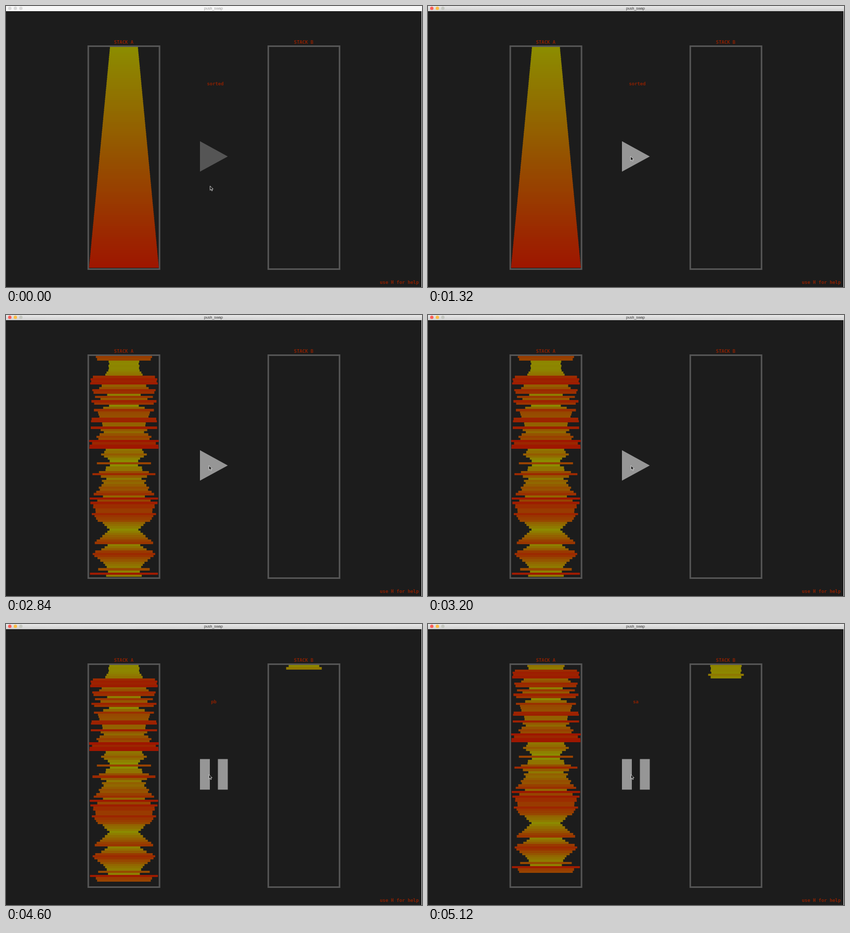
Write an HTML page that moves like this. It is 800 px wide and 542 px high and loops after 5160 ms.

```html
<!DOCTYPE html>
<html lang="en">
<head>
<meta charset="utf-8">
<title>push_swap</title>
<style>
  html, body { margin: 0; width: 100%; height: 100%; overflow: hidden; background: #1c1c1c; }
  svg { display: block; width: 800px; height: 542px; }
  .label { font: bold 8.9px "DejaVu Sans Mono", "Liberation Mono", monospace; fill: #8c2000; }
  #title { font: 7.1px "Liberation Sans", Arial, sans-serif; text-anchor: middle; }
  .frame { fill: none; stroke: #555; stroke-width: 3; }
</style>
</head>
<body>
<svg viewBox="0 0 800 542" xmlns="http://www.w3.org/2000/svg">
  <linearGradient id="active" x2="0" y2="1">
    <stop stop-color="#e8e8e8"/>
    <stop offset="1" stop-color="#d0d0d0"/>
  </linearGradient>
  <rect width="800" height="542" fill="#1c1c1c"/>
  <rect x="799" width="1" height="542" fill="#e0e0e0"/>
  <rect id="bar" width="800" height="10"/>
  <circle class="light" cx="7.3" cy="4.4" r="3.2"/>
  <circle class="light" cx="18" cy="4.4" r="3.2"/>
  <circle class="light" cx="28.6" cy="4.4" r="3.2"/>
  <text id="title" x="399" y="7">push_swap</text>

  <rect class="frame" x="158.2" y="77.5" width="137" height="430"/>
  <rect class="frame" x="504.4" y="77.5" width="137" height="430"/>
  <g id="stacks"></g>

  <text class="label" x="207.7" y="72.7">STACK A</text>
  <text class="label" x="553.8" y="72.7">STACK B</text>
  <text class="label" x="719" y="536">use H for help</text>
  <text class="label" id="op" y="152.5"></text>

  <path id="button"/>
  <path id="cursor" d="M0 0V8.4L2 6.6L3.3 9.6L4.7 9L3.4 6.1H6Z" fill="#111" stroke="#eee" stroke-width=".8"/>
</svg>
<script>
const LOOP = 5160, COUNT = 100, TOP = 79, PITCH = 4.265;
const FOCUS = 960, SHUFFLE = 2640, PRESS = 4200, PLAY = 4280, RELEASE = 4440, STEP = 80;
const CENTER = { a: 226.8, b: 573 };
const OPS = ['rra', 'pb', 'ra', 'ra', 'pb', 'sb', 'pb', 'pb', 'pb', 'pb', 'sa'];
const PLAY_ICON = 'M373 260.7L426.5 290.2L373 319.5Z';
const PAUSE_ICON = 'M373 260.5h19v59h-19zM407.5 260.5h19v59h-19z';

// Outline of the shuffled stack: row, width
const OUTLINE = [[0, 109], [1, 101], [2, 62], [5, 60], [8, 70], [9, 116], [24, 82], [40, 118],
  [46, 70], [60, 104], [73, 107], [78, 58], [84, 111], [85, 66], [89, 118], [95, 65],
  [96, 95], [97, 62], [98, 131], [99, 68]];
// Cursor keys: time, x, y
const PATH = [[120, 392.4, 347], [640, 388.7, 286.2], [1000, 388.7, 286.2],
  [1600, 390.4, 293], [2300, 390.4, 293], [2900, 390.3, 290.5]];

const $ = id => document.getElementById(id);
const lights = document.querySelectorAll('.light');
const set = (el, attrs) => { for (const k in attrs) el.setAttribute(k, attrs[k]); };
const mix = (a, b, p) => a + (b - a) * p;
const smooth = p => p * p * (3 - 2 * p);
const linear = p => p;

// Value of column `col` in a list of keys at position x
function along(keys, x, col, ease) {
  const i = keys.findIndex(k => k[0] > x);
  if (i === 0) return keys[0][col];
  if (i < 0) return keys[keys.length - 1][col];
  const from = keys[i - 1], to = keys[i];
  return mix(from[col], to[col], ease((x - from[0]) / (to[0] - from[0])));
}

let seed = 7;
const random = () => (seed = seed * 16807 % 2147483647) / 2147483647;

const sorted = Array.from({ length: COUNT }, (_, i) => i);

// Rough rows in the upper and middle part, calm ones elsewhere
const rough = sorted.map(row => {
  const spread = row > 9 && row < 72 ? 70 : 5;
  return along(OUTLINE, row, 1, linear) + (random() - 0.5) * spread;
});
const shuffled = [];
[...sorted].sort((i, j) => rough[i] - rough[j]).forEach((row, rank) => shuffled[row] = rank);

const widthOf = rank => mix(54, 134, rank / (COUNT - 1));
const bars = sorted.map(rank => {
  const p = rank / (COUNT - 1);
  const el = document.createElementNS('http://www.w3.org/2000/svg', 'rect');
  set(el, { width: widthOf(rank), fill: `rgb(${mix(140, 158, p)},${mix(140, 22, p)},0)` });
  $('stacks').append(el);
  return el;
});

const swap = s => s.unshift(...s.splice(0, 2).reverse());
const run = {
  rra: (a) => a.unshift(a.pop()),
  ra: (a) => a.push(a.shift()),
  pb: (a, b) => b.unshift(a.shift()),
  sa: (a) => swap(a),
  sb: (a, b) => swap(b)
};

function place(stack, center) {
  stack.forEach((rank, i) => {
    const y = Math.round(TOP + i * PITCH), next = Math.round(TOP + (i + 1) * PITCH);
    set(bars[rank], { x: center - widthOf(rank) / 2, y, height: next - y });
  });
}

let lastKey;
function draw(t) {
  const focused = t >= FOCUS, playing = t >= PLAY;
  const pressed = t >= PRESS && t < RELEASE;
  const [x, y] = [1, 2].map(col => along(PATH, t, col, smooth));
  set($('cursor'), { transform: `translate(${x} ${y})` });
  set($('bar'), { fill: focused ? 'url(#active)' : '#f6f6f6' });
  set($('title'), { fill: focused ? '#303030' : '#999' });
  const colors = focused ? ['#fc5b57', '#fdbc40', '#c4c7c0'] : ['#d8d8d8', '#d8d8d8', '#d8d8d8'];
  lights.forEach((el, i) => set(el, { fill: colors[i] }));
  set($('button'), {
    d: playing ? PAUSE_ICON : PLAY_ICON,
    fill: pressed ? '#383838' : focused ? '#969696' : '#555'
  });

  const done = playing ? Math.min(OPS.length, Math.floor((t - PLAY) / STEP) + 1) : 0;
  const key = t < SHUFFLE ? -1 : done;
  if (key === lastKey) return;
  lastKey = key;

  const a = [...(t < SHUFFLE ? sorted : shuffled)], b = [];
  OPS.slice(0, done).forEach(op => run[op](a, b));
  place(a, CENTER.a);
  place(b, CENTER.b);

  const text = t < SHUFFLE ? 'sorted' : done ? OPS[done - 1] : '';
  $('op').textContent = text;
  set($('op'), { x: text === 'sorted' ? 386.5 : 399.6 - text.length * 2.68 });
}

const start = performance.now();
function tick() {
  draw((performance.now() - start) % LOOP);
  requestAnimationFrame(tick);
}
tick();
</script>
</body>
</html>
```
